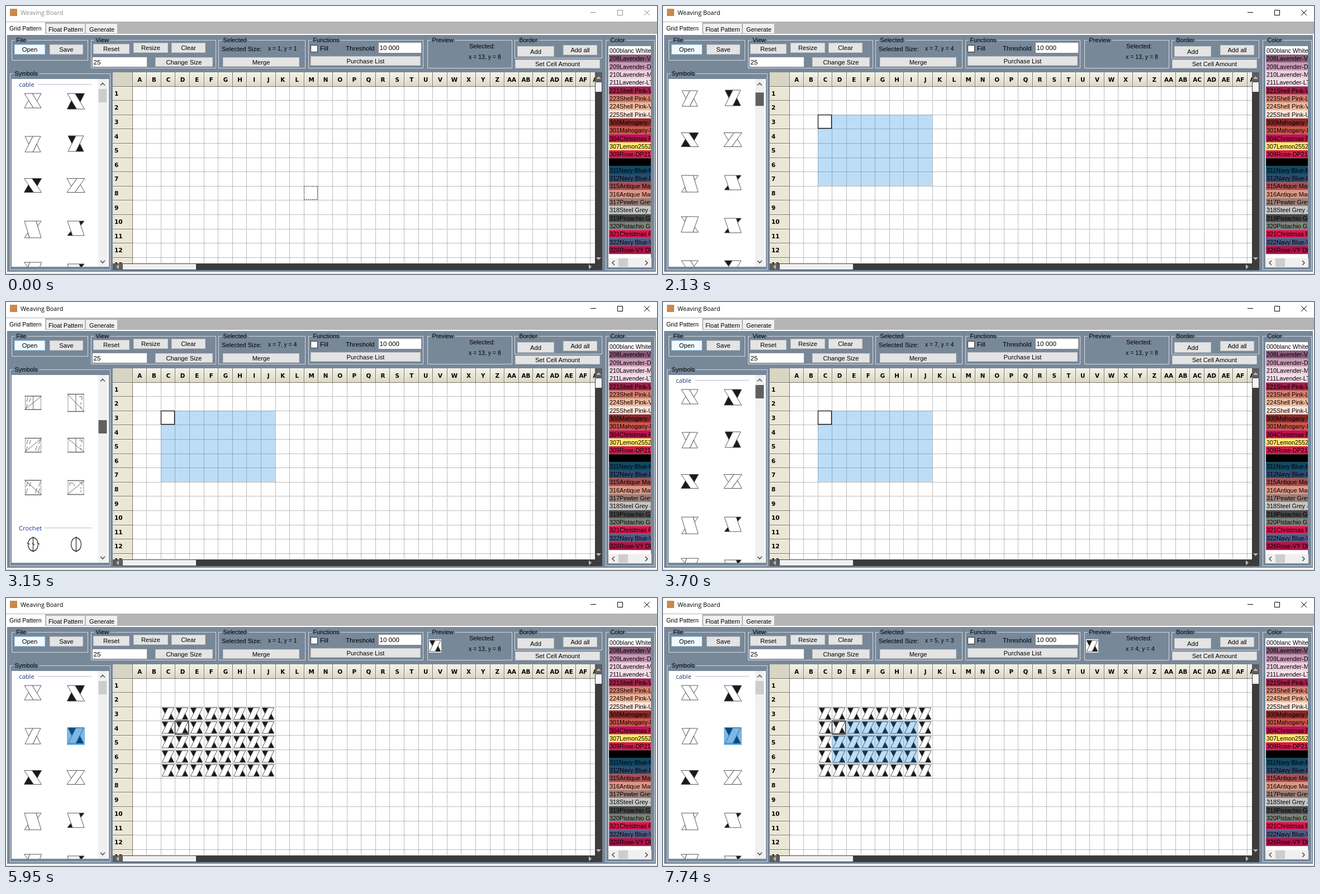
These frames come from a looping animation (1165x481 px, 8000 ms). An HTML page:

```html
<!DOCTYPE html>
<html lang="en">
<head>
<meta charset="utf-8">
<title>Weaving Board</title>
<style>
  html, body { margin: 0; width: 100%; height: 100%; overflow: hidden; background: #fff; }
  svg { display: block; width: 1165px; height: 481px; }
  text { font-family: "Liberation Sans", Arial, sans-serif; white-space: pre; }
  .ui { font-family: "Open Sans", sans-serif; }
  .head { font-family: "DejaVu Sans", sans-serif; font-weight: bold; }
  .thin path { vector-effect: non-scaling-stroke; }
</style>
</head>
<body>
<svg id="stage" viewBox="0 0 1165 481" xmlns="http://www.w3.org/2000/svg"></svg>
<script>
const LOOP = 8000, CELL = 25.6, GX = 226, GY = 144;
const SLATE = '#778899';
const colX = i => Math.floor(GX + CELL * i);
const rowTop = j => Math.floor(GY + CELL * j);

// drawing helpers
const rect = (x, y, w, h, fill, more = '') =>
  `<rect x="${x}" y="${y}" width="${w}" height="${h}" fill="${fill}" ${more}/>`;
const path = (d, stroke, width = 1, more = '') =>
  `<path d="${d}" fill="none" stroke="${stroke}" stroke-width="${width}" ${more}/>`;
const text = (x, cy, s, size = 11.2, more = '') =>
  `<text x="${x}" y="${cy + 4}" font-size="${size}" ${more}>${s}</text>`;
const group = (id, body, more = '') => `<g id="${id}" ${more}>${body}</g>`;
const clip = (id, x, y, w, h) => `<clipPath id="${id}">${rect(x, y, w, h, '#000')}</clipPath>`;

const button = (x, y, w, h, label, fill = '#e4e4e4', edge = '#c4c4c4') =>
  rect(x + .5, y + .5, w - 1, h - 1, fill, `stroke="${edge}"`) +
  text(x + w / 2, y + h / 2, label, 11.2, 'text-anchor="middle"');

const box = (x, y, w, h, label, labelWidth) =>
  path(`M${x + 6} ${y + .5}H${x + .5}V${y + h + .5}H${x + w + .5}V${y + .5}H${x + labelWidth + 11}`, '#d5dae0') +
  text(x + 8.5, y, label, 10.8);

const field = (x, y, w, h, value) =>
  rect(x + .5, y + .5, w - 1, h - 1, '#fff', 'stroke="#8a8f96"') + text(x + 2.5, y + h / 2, value, 11.6);

// two crossing bands; fill blackens the corners behind the front one
function cross(cx, cy, w, h, b, slash, fill) {
  const p = (x, y) => `${(cx + (slash ? -1 : 1) * (x - w / 2)).toFixed(1)} ${(cy + y - h / 2).toFixed(1)}`;
  const k = (w - b) / w, tx = b + (w - b) * k, ty = h * k;
  const poly = (pts, f) => `<path d="M${pts.join('L')}Z" fill="${f}" stroke="#444" stroke-width=".9"/>`;
  const back = fill ? '#1a1a1a' : '#fff';
  return poly([p(b, 0), p(w, 0), p(tx, ty)], back) +
    poly([p(w - b, h), p(0, h), p(w - tx, h - ty)], back) +
    poly([p(0, 0), p(b, 0), p(w, h), p(w - b, h)], '#fff');
}

const STROKES = {
  s: 'M0 30L30 0', n: 'M0 0L30 30', v: 'M15 0V30',
  l: 'M6 3L3 13M5 17L2 28M11 4L8 13', r: 'M28 3L25 13M27 17L24 28M22 16L19 27',
  a: 'M4 5Q12 4 13 12M4 5V11', c: 'M21 4H26V10M24 14V18M24 21V25'
};
function boxed(cx, cy, h, code) {
  const lines = [...code].map(c => c === 'b' ? path(STROKES.s, '#333', 2) : path(STROKES[c], '#666')).join('');
  return `<g class="thin" transform="translate(${cx - 15} ${cy - h / 2}) scale(1 ${h / 30})">` +
    path('M1 0V30M29 0V30', '#999') + path('M0 0H30M0 30H30', '#666', 1.3) + lines + '</g>';
}

// width, height, band, slash, fill, drop
const CROSSES = [
  [[30, 26, 14, 0, 0, 0], [31, 28, 14, 0, 1, 1]],
  [[28, 28, 14, 1, 0, 2], [28, 28, 14, 1, 1, 1]],
  [[31, 25, 14, 0, 1, 0], [32, 25, 14, 1, 0, 0]],
  [[30, 30, 21, 0, 0, 3], [30, 26, 21, 0, 1, 1]],
  [[31, 28, 21, 1, 0, 0], [30, 26, 21, 0, 1, 2]],
  [[30, 22, 16, 0, 0, 0], [30, 22, 16, 1, 1, 0]]
];
const BOXES = ['32sl 32nr', '30nc 30sa', '32sa 32bn', '32lrn 29nl', '26vnl 26sna', '24lvs 31vcn', '25slr 25cvn', '26rln 25sca'];
const rowY = k => 170 + 76 * k;

function symbolList() {
  const head = (y, s, x, color) => text(23, y, s, 11.3, `class="ui" fill="${color}"`) +
    path(`M${x} ${y - .5}H154`, '#b4bfd6');
  let out = head(141, 'cable', 57, '#1f3f7a');
  CROSSES.forEach((pair, k) => pair.forEach(([w, h, b, slash, fill, drop], i) =>
    out += cross(i ? 125 : 48, rowY(k) + drop, w, h, b, slash, fill)));
  BOXES.forEach((pair, k) => pair.split(' ').forEach((code, i) =>
    out += boxed(i ? 125 : 48.5, rowY(k + 6), parseInt(code), code.slice(2))));
  out += head(1231, 'Crochet', 68, '#2238a0');
  for (let k = 0; k < 4; k++) for (let i = 0; i < 2; i++) {
    const x = i ? 125.5 : 48.5, y = 1260 + 76 * k, w = 9 - k;
    out += `<ellipse cx="${x}" cy="${y}" rx="${w}" ry="12" fill="none" stroke="#333" stroke-width="1.3"/>` +
      path(`M${x} ${y - 14}V${y + 14}`, '#333', 1.3);
    if (i === k % 2) out += path(`M${x - w - 2} ${y - 3}l5 3M${x - 2} ${y - 2}l5 3M${x + w - 2} ${y - 3}l5 3`, '#333', 1.2);
  }
  return out + rect(109, 232, 32, 32, '#0078d7', 'id="pick" opacity=".52"');
}

const THREADS = [
  '000blanc White #fff', '208Lavender-VY #8b5a7c', '209Lavender-DK #c998b5', '210Lavender-MD #ecd0de',
  '211Lavender-LT #f3dfea', '221Shell Pink-VY #a3204a', '223Shell Pink-LT #d5816f', '224Shell Pink-VY #f0b89c',
  '225Shell Pink-UL #fde6da', '300Mahogany-VY #8c2a2c', '301Mahogany-MD #c9574a', '304Christmas Red #c0104f',
  '307Lemon2552 #ffe96b', '309Rose-DP21 #d81b50', '310Black #000', '311Navy Blue-MD #0d4a66',
  '312Navy Blue-LT #2c4d70', '315Antique Mauve #a84f50', '316Antique Mauve #dd9884', '317Pewter Grey #9f7f78',
  '318Steel Grey -LT #c6c6c6', '319Pistachio Gr #484848', '320Pistachio Gr #7d857a', '321Christmas Red #d8164f',
  '322Navy Blue-VY #4b5c85', '326Rose-VY DP #b01548'
];
function threadList() {
  let out = rect(1078, 72, 77, 398, '#fff');
  THREADS.forEach((t, i) => {
    const cut = t.lastIndexOf(' '), y = 72.8 + 14.32 * i;
    out += rect(1079, y.toFixed(2), 75, 14.4, t.slice(cut + 1)) + text(1080, y + 7.2, t.slice(0, cut), 10.8);
  });
  return `<g clip-path="url(#threads)">${out}</g>` + rect(1078, 452, 77, 17, '#f0f0f0') +
    rect(1096, 453, 17, 15, '#cdcdcd') + path('M1089 457l-4 4l4 4M1144 457l4 4l-4 4', '#505050', 1.6);
}

function gridBase() {
  const name = i => (i < 26 ? '' : 'A') + String.fromCharCode(65 + i % 26);
  let out = rect(191, 119, 863, 343, '#fff') + rect(191, 119, 863, 25, 'url(#beige)') +
    rect(191, 144, 35, 318, '#ebe7d7') + rect(191, 119, 35, 25, '#d9d5c3');
  let dots = '', cuts = 'M191 144.5H1054M226.5 119V462', shine = '';
  for (let i = 0; i < 33; i++) {
    const x = colX(i) + .5;
    if (i) dots += `M${x} 145V462`;
    cuts += `M${x} 119V144`;
    shine += `M${x + 1} 120V143`;
    out += text(GX + CELL * (i + .5) + .5, 131.5, name(i), 10.3, 'class="head" text-anchor="middle"');
  }
  for (let j = 0; j < 13; j++) {
    const y = rowTop(j) + .5;
    if (j) dots += `M227 ${y}H1054`;
    cuts += `M191 ${y}H226`;
    shine += `M191 ${y + 1}H225`;
    out += text(194, GY + CELL * (j + .5), j + 1, 10.6, 'class="head"');
  }
  out += path(shine, '#faf8ee') + path(cuts, '#77756c') + path(dots, '#8c8c8c', 1, 'stroke-dasharray="1.5 1.1"');
  return `<g clip-path="url(#grid)">${out}</g>`;
}

function gridBars() {
  return rect(1054, 119, 13, 355, '#3c3c3c') + rect(191, 462, 863, 12, '#3c3c3c') +
    rect(1054, 119, 13, 18, '#5c5c5c') + rect(191, 462, 18, 12, '#5c5c5c') +
    rect(1055, 137, 11, 17, '#f4f4f4') + rect(209, 463, 131, 10, '#f0f0f0') +
    '<path d="M1056 131h9l-4.5-5zM1056 451h9l-4.5 5zM202 463.5v9l-5-4.5zM1043 463.5v9l5-4.5z" fill="#b8b8b8"/>';
}

const cells = [2, 3, 4, 5, 6].map(r => {
  let row = '';
  for (let c = 2; c < 10; c++) row += cross(colX(c) + 13, rowTop(r) + 12.5, 21.5, 21, 11, 1, 1);
  return `<g class="row">${row}</g>`;
}).join('');

document.getElementById('stage').innerHTML =
  `<defs><linearGradient id="beige" x2="0" y2="1"><stop stop-color="#f5f3e8"/><stop offset="1" stop-color="#dcd8c6"/></linearGradient>
  ${clip('grid', 191, 119, 863, 343)}${clip('threads', 1078, 72, 76, 380)}${clip('symbols', 10, 131, 155, 337)}</defs>` +
  rect(0, 0, 1165, 481, '#fff') + rect(0, 28, 1165, 22, '#b4b4b4') + rect(7, 5, 13, 13, '#c98a4b') +
  group('caption', text(26, 11.5, 'Weaving Board', 10.9, 'class="ui" fill="currentColor"') +
    path('M1046 11.5H1056M1094.5 7.5h9v9h-9zM1142 7l10 10M1152 7l-10 10', 'currentColor')) +
  rect(0, 29, 70, 23, '#fff') + rect(72, 32, 69, 17, '#f0f0f0') + rect(143, 32, 56, 17, '#f0f0f0') +
  text(6, 39.5, 'Grid Pattern', 10.7) + text(76, 41.5, 'Float Pattern', 10.8) + text(149, 41.5, 'Generate', 10.8) +
  rect(2, 52, 1161, 425, SLATE) + rect(0, 479, 1165, 1, '#d0d0d0') +
  box(10, 61, 136, 36, 'File', 17) + button(15, 69, 55, 18, 'Open', '#f3f9fe', '#a8d8f6') + button(78, 69, 60, 18, 'Save') +
  box(152, 61, 223, 50, 'View', 24) + button(156, 68, 65, 18, 'Reset') + button(228, 66, 62, 18, 'Resize') +
  button(296, 66, 61, 18, 'Clear') + field(154, 91, 99, 19, '25') + button(267, 92, 103, 17, 'Change Size') +
  box(380, 61, 155, 50, 'Selected', 43) + text(386, 76.5, 'Selected Size:', 11.2) +
  text(469, 76, '', 10.4, 'id="size"') + button(388, 92, 137, 17, 'Merge') +
  box(541, 61, 205, 50, 'Functions', 47) + rect(545.5, 70.5, 12, 12, '#fff', 'stroke="#333"') +
  text(562, 76, 'Fill', 11.6) + text(608, 76, 'Threshold', 11.6) + field(666, 65, 78, 20, '10 000') +
  button(545, 90, 197, 17, 'Purchase List') +
  box(754, 61, 151, 50, 'Preview', 39) + text(829, 72, 'Selected:', 11) + text(828, 91, '', 10.5, 'id="spot"') +
  group('preview', rect(757, 74, 22, 24, '#fff') + cross(768, 86, 20, 20, 10, 1, 1)) +
  box(910, 61, 156, 32, 'Border', 33) + button(915, 72, 66, 19, 'Add') + button(997, 70, 61, 18, 'Add all') +
  button(911, 96, 152, 16, 'Set Cell Amount') +
  box(7, 121, 179, 352, 'Symbols', 41) + rect(10, 131, 174, 337, '#fff') +
  `<g clip-path="url(#symbols)">${group('list', symbolList())}</g>` +
  rect(165, 131, 16, 337, '#f0f0f0') + path('M169 142.5l4-4l4 4M169 457l4 4l4-4', '#505050', 1.6) +
  rect(165.5, 149, 15, 24, '#cdcdcd', 'id="thumb"') +
  box(1073, 61, 87, 412, 'Color', 26) + threadList() +
  gridBase() + cells + '<path id="tint" fill="#0078d7" fill-opacity=".26" fill-rule="evenodd"/>' +
  '<rect id="focus" width="24" height="24" fill="none"/>' + gridBars();

// timelines: [time, values...]
const RANGE = [ // column, row, columns, rows, size text
  [0, 12, 7, 1, 1, 1, 1], [500, 2, 2, 1, 1, 1, 1], [670, 2, 2, 6, 3, 5, 2], [730, 2, 2, 8, 5, 7, 4],
  [5950, 3, 3, 1, 1, 1, 1], [7040, 3, 3, 3, 2, 2, 1], [7120, 3, 3, 5, 2, 4, 1],
  [7290, 3, 3, 5, 3, 4, 2], [7740, 3, 3, 6, 3, 5, 3]
];
const SCROLL = [
  [0, 0], [1990, 14], [2060, 40], [2130, 82], [2220, 150], [2300, 240], [2380, 350], [2450, 480], [2530, 618],
  [2610, 750], [2690, 870], [2760, 950], [2850, 1000], [3000, 970], [3080, 910], [3150, 825], [3230, 700],
  [3310, 570], [3390, 440], [3470, 310], [3550, 180], [3620, 70], [3700, 0]
];
const THUMB = [[0, '#cdcdcd'], [1750, '#a6a6a6'], [1990, '#606060'], [4310, '#a6a6a6'], [4470, '#bababa'], [4620, '#cdcdcd']];
const FILLED = [[0, 0], [4865, 3], [4940, 5]];

const $ = id => document.getElementById(id);
const rows = document.querySelectorAll('.row');
const at = (line, t) => line.filter(s => s[0] <= t).pop().slice(1);
const show = (node, on) => node.setAttribute('visibility', on ? 'visible' : 'hidden');
const area = (c, r, nc, nr) => `M${colX(c)} ${rowTop(r)}H${colX(c + nc)}V${rowTop(r + nr)}H${colX(c)}z`;

function render(t) {
  const active = t >= 500, picked = t >= 4790;
  const [c, r, nc, nr, sx, sy] = at(RANGE, t);
  const [scroll] = at(SCROLL, t);

  $('caption').setAttribute('color', active ? '#000' : '#8c8c8c');
  $('size').textContent = `x = ${sx}, y = ${sy}`;
  $('spot').textContent = t < 6050 ? 'x = 13, y = 8' : 'x = 4, y = 4';

  $('tint').setAttribute('d', area(c, r, nc, nr) + area(c, r, 1, 1));
  const focus = $('focus');
  focus.setAttribute('x', colX(c) + .5);
  focus.setAttribute('y', rowTop(r) + .5);
  focus.setAttribute('stroke', active ? '#111' : '#555');
  focus.setAttribute('stroke-width', active ? 1.3 : 1);
  focus.setAttribute('stroke-dasharray', active ? 'none' : '2.5 1');

  $('list').setAttribute('transform', `translate(0 ${-scroll})`);
  $('thumb').setAttribute('y', (149 + scroll / 13.1).toFixed(1));
  $('thumb').setAttribute('fill', at(THUMB, t)[0]);

  show($('pick'), picked);
  show($('preview'), picked);
  rows.forEach((row, i) => show(row, i < at(FILLED, t)[0]));
}

const start = performance.now();
function tick() {
  render((performance.now() - start) % LOOP);
  requestAnimationFrame(tick);
}
tick();
</script>
</body>
</html>
```
